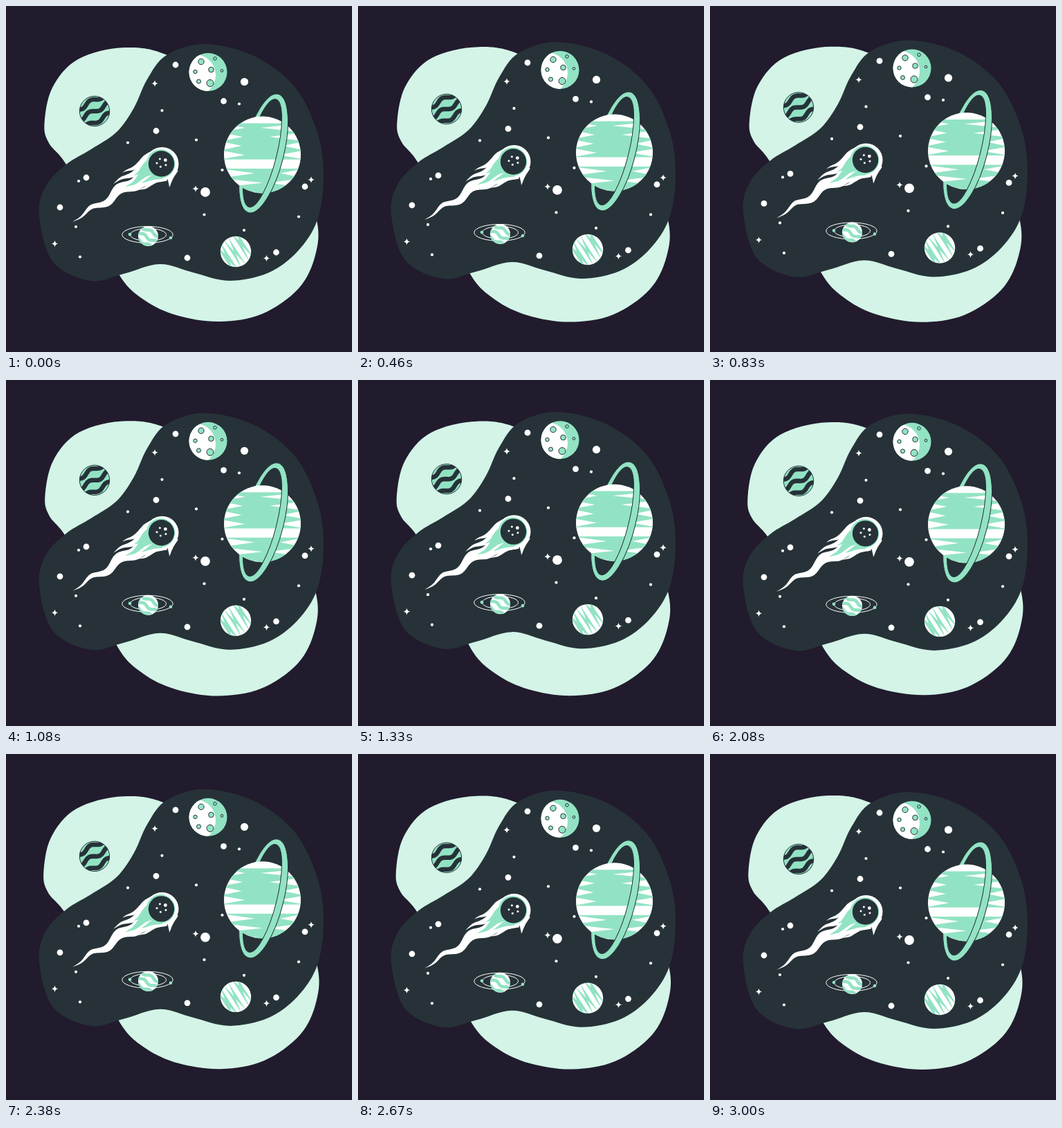
These frames come from a looping animation (500x500 px, 3040 ms). An HTML page with a canvas:

```html
<!DOCTYPE html>
<html lang="en">
<head>
<meta charset="utf-8">
<title>Floating space</title>
<style>
html, body { margin: 0; width: 100%; height: 100%; overflow: hidden; background: #211b2d; }
canvas { display: block; width: 100%; height: 100%; }
</style>
</head>
<body>
<canvas id="stage" width="500" height="500"></canvas>
<script>
const ctx = document.getElementById('stage').getContext('2d');
const NIGHT = '#211b2d', PALE = '#d3f4e7', DARK = '#263238', MINT = '#92e3c4', WHITE = '#fff';
const LOOP = 3040, CYCLE = 3000, TAU = 2 * Math.PI;

// Smooth closed curve through key points
function blob(pts) {
  const path = new Path2D(), at = i => pts[(i + pts.length) % pts.length];
  path.moveTo(...pts[0]);
  pts.forEach((p, i) => {
    const prev = at(i - 1), next = at(i + 1), after = at(i + 2);
    path.bezierCurveTo(
      p[0] + (next[0] - prev[0]) / 6, p[1] + (next[1] - prev[1]) / 6,
      next[0] - (after[0] - p[0]) / 6, next[1] - (after[1] - p[1]) / 6, ...next);
  });
  return path;
}

const backdrop = blob([[172, 60], [240, 74], [345, 140], [420, 230], [449, 309], [447, 360], [423, 408], [370, 445],
  [308, 456], [247, 447], [200, 425], [164, 389], [130, 310], [87, 229], [62, 198], [55.5, 170], [67, 118], [104, 77]]);
const sky = blob([[288, 55], [232, 71], [204, 106], [185, 147], [160, 182], [123, 207], [87, 229], [57, 261], [48, 304],
  [68, 370], [122, 397], [170, 387], [222, 373], [270, 385], [322, 397], [378, 386], [421, 355],
  [450, 309], [459, 246], [450, 183], [418, 118], [360, 73]]);

const bigStars = [[245, 85], [314.5, 137.5], [217, 180.5], [116, 248], [78, 291], [432, 261], [390.5, 356], [262, 364]];
const smallStars = [[337, 141.5], [225.5, 151], [275, 193.5], [176, 197.5], [105, 253], [101, 319],
  [107, 362.5], [312.5, 237], [286.5, 301.5], [344, 324], [423, 304.5]];
const sparkles = [[215, 112], [274, 264], [441, 251], [376.5, 364.5], [70.5, 343.5]];
const craters = [[282, 80.5, 4.2], [302, 76, 2.3], [296.5, 92, 3.8], [312, 93.5, 1.9],
  [273.5, 95, 2.7], [278.5, 109, 3], [295, 111.5, 5]];

function fill(path, color) {
  ctx.fillStyle = color;
  ctx.fill(path, 'evenodd');
}

function oval(x, y, rx, ry = rx) {
  const path = new Path2D();
  path.ellipse(x, y, rx, ry, 0, 0, TAU);
  return path;
}

const disc = (x, y, r, color) => fill(oval(x, y, r), color);

function outline(path, color, width = 1) {
  ctx.strokeStyle = color;
  ctx.lineWidth = width;
  ctx.stroke(path);
}

function sparkle(x, y, r = 4.8, waist = .6) {
  const path = new Path2D();
  path.moveTo(x, y - r);
  for (const [dx, dy] of [[1, 0], [0, 1], [-1, 0], [0, -1]]) {
    const side = dx + dy, flip = dx ? -dx : dy;
    path.quadraticCurveTo(x + side * waist, y + flip * waist, x + dx * r, y + dy * r);
  }
  fill(path, WHITE);
}

// Disc with markings painted in unit coordinates, clipped to its edge
function planet(x, y, r, base, angle, paint) {
  ctx.save();
  disc(x, y, r, base);
  ctx.clip(oval(x, y, r));
  ctx.translate(x, y);
  ctx.rotate(angle);
  ctx.scale(r, r);
  paint();
  ctx.restore();
}

function seeded(seed) {
  return () => (seed = seed * 16807 % 2147483647) / 2147483647;
}

// Band whose two ends are cut by long spikes
function jagged(top, bottom, steps, random) {
  const path = new Path2D(), rows = [...Array(steps + 1).keys()];
  const row = (i, side) => path.lineTo(
    side * (i % 2 ? .6 * random() - .05 : 1.1), top + (bottom - top) * i / steps);
  rows.forEach(i => row(i, 1));
  rows.reverse().forEach(i => row(i, -1));
  fill(path, MINT);
}

function wave(y, amp, width, color) {
  const path = new Path2D();
  for (let x = -1.2; x <= 1.2; x += .1) path.lineTo(x, y + amp * Math.sin(4.5 * x + 3 * y));
  outline(path, color, width);
}

// Wavy flame that narrows to a point
function flame(x0, y0, x1, y1, width, sway, color) {
  const dx = x1 - x0, dy = y1 - y0, len = Math.hypot(dx, dy), path = new Path2D();
  const edge = (t, side) => {
    const off = sway * Math.sin(len * t / 8) * Math.min(1, 3 * t) * Math.min(1, 4 - 4 * t)
      + side * width * (1 - t);
    path.lineTo(x0 + dx * t - dy / len * off, y0 + dy * t + dx / len * off);
  };
  for (let t = 0; t <= 1; t += 1 / 32) edge(t, 1);
  for (let t = 1; t >= 0; t -= 1 / 32) edge(t, -1);
  fill(path, color);
}

function moon() {
  planet(292, 95.5, 27.5, MINT, 0, () => disc(-.69, .16, 1.09, WHITE));
  for (const [x, y, r] of craters) {
    disc(x, y, r, MINT);
    outline(oval(x, y, r), DARK);
  }
}

function ring(frontOnly) {
  ctx.save();
  ctx.translate(372, 213);
  ctx.rotate(14 * Math.PI / 180);
  if (frontOnly) {
    ctx.beginPath();
    ctx.rect(0, -62, 45, 124);
    ctx.clip();
  }
  const band = oval(0, 0, 29.2, 88.3);
  band.addPath(oval(-1.5, 0, 20.8, 80.2));
  fill(band, MINT);
  outline(band, DARK);
  ctx.restore();
}

function giant() {
  ring(false);
  planet(370.5, 215, 55.5, WHITE, 0, () => {
    const random = seeded(41);
    jagged(-.82, .12, 8, random);
    jagged(.36, 1.1, 6, random);
  });
  ring(true);
}

function comet() {
  flame(218, 234, 96, 312, 13, 4, WHITE);
  flame(216, 222, 155, 257, 9, 2.5, WHITE);
  flame(218, 214, 168, 241, 8, 2, WHITE);
  flame(222, 246, 164, 271, 8, 2, WHITE);
  flame(230, 246, 191, 266, 7, 2, WHITE);
  flame(241, 236, 236, 262, 8, 1, WHITE);
  disc(225.5, 228, 24, WHITE);
  flame(214, 234, 172, 262, 9, 2, MINT);
  flame(216, 224, 184, 245, 8, 2, MINT);
  flame(224, 244, 195, 256, 6, 1, MINT);
  disc(223.5, 228, 20.8, MINT);
  disc(224.5, 228, 18.7, DARK);
  for (let i = 0; i < 5; i++) {
    const a = i * TAU / 5 - .7;
    disc(225 + 7 * Math.cos(a), 226.5 + 6 * Math.sin(a), i ? 1.5 : 2.4, WHITE);
  }
}

function dwarf() {
  outline(oval(204.5, 330.5, 36.7, 12), WHITE);
  outline(oval(205.5, 330.5, 26, 9), WHITE);
  planet(205.5, 332.5, 14.5, WHITE, .5, () => {
    for (const y of [-.5, .15, .8]) wave(y, .12, .32, MINT);
  });
  disc(179, 330, 2.3, MINT);
  disc(238, 335, 2.3, MINT);
}

function scene() {
  fill(sky, DARK);
  for (const [x, y] of bigStars) disc(x, y, 4.4, WHITE);
  for (const [x, y] of smallStars) disc(x, y, 2.1, WHITE);
  disc(344.5, 109.5, 5.6, WHITE);
  disc(288, 269, 6.9, WHITE);
  for (const [x, y] of sparkles) sparkle(x, y);
  moon();
  giant();
  planet(128, 152, 21.7, MINT, -.5, () => {
    for (const y of [-.65, 0, .65]) wave(y, .13, .3, DARK);
  });
  outline(oval(128, 152, 21.7), DARK);
  comet();
  dwarf();
  planet(332, 355, 22.2, WHITE, 1, () => {
    const random = seeded(7);
    for (const y of [-.75, -.1, .5]) jagged(y, y + .36, 2, random);
  });
}

function draw() {
  const p = Math.min(performance.now() % LOOP / CYCLE, 1);
  const lift = 10 * (1 - Math.abs(2 * p - 1));
  const tilt = p < .25 ? 4 * p : p < .75 ? 2 - 4 * p : 4 * p - 4;
  ctx.fillStyle = NIGHT;
  ctx.fillRect(0, 0, 500, 500);
  ctx.save();
  ctx.translate(254, 258);
  ctx.rotate(tilt * Math.PI / 180);
  ctx.translate(-254, -258);
  fill(backdrop, PALE);
  ctx.restore();
  ctx.save();
  ctx.translate(0, -lift);
  scene();
  ctx.restore();
  requestAnimationFrame(draw);
}
draw();
</script>
</body>
</html>
```
